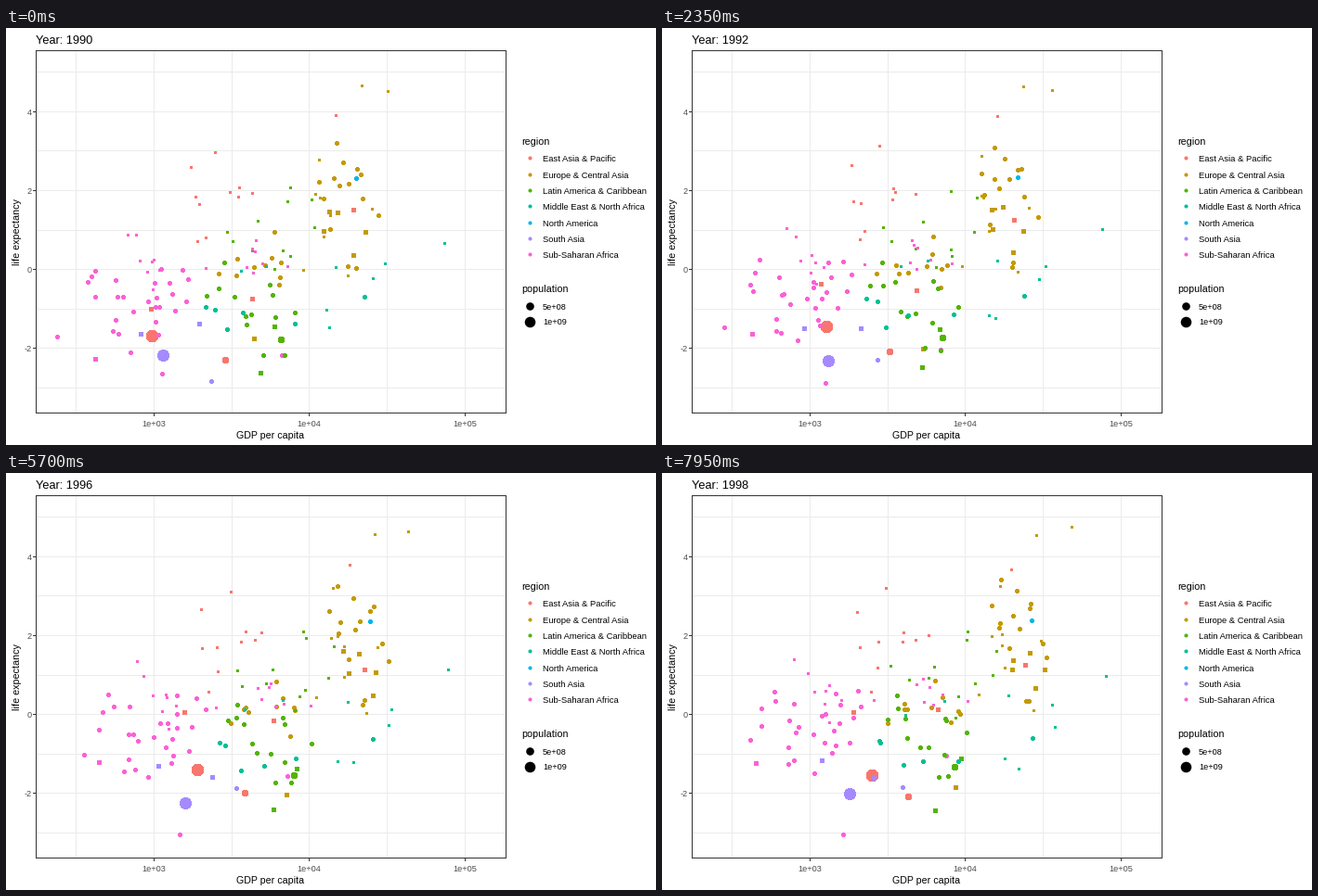
Recreate the animation shown at these times as a matplotlib script. Size 700 by 450 pixels, loop 8000 ms.

```python
import numpy as np
import matplotlib.pyplot as plt
from matplotlib.animation import FuncAnimation

W, H, DPI = 700, 450, 100
FRAMES, STEP = 160, 50
FRAMES_PER_YEAR = 19.1

EAST_ASIA, EUROPE, LATIN = "#F8766D", "#C49A00", "#53B400"
MIDDLE_EAST, NORTH_AM = "#00C094", "#00B6EB"
SOUTH_ASIA, AFRICA = "#A58AFF", "#FB61D7"
TINY, SMALL, MID, LARGE = 1.2, 2.05, 2.5, 3.1

plt.rcParams["font.family"] = "Liberation Sans"
fig = plt.figure(figsize=(W / DPI, H / DPI), dpi=DPI, facecolor="white")
ax = fig.add_axes([0, 0, 1, 1])
ax.set_xlim(0, W)
ax.set_ylim(H, 0)
ax.axis("off")


def label(x, y, text, px, color="black", **kw):
    kw.setdefault("va", "baseline")
    return ax.text(x, y, text, fontsize=px * 72 / DPI, color=color, **kw)


def line(xs, ys, color):
    ax.plot(xs, ys, color=color, lw=72 / DPI, antialiased=False,
            solid_capstyle="butt", zorder=1)


def discs(x, y, r, color, z=3):
    area = (2 * np.asarray(r) * 72 / DPI) ** 2
    return ax.scatter(x, y, s=area, c=color, linewidths=0,
                      antialiased=False, zorder=z)


# Positions are worked out once per year; frames blend between two years.
rng = np.random.default_rng(12)
years = np.arange(10)
t = years * FRAMES_PER_YEAR / (FRAMES - 1)
dots = []


def add(color, r, start, end, bend=0.0, wobble=0.0):
    """A straight drift with a vertical bow and a yearly random shift."""
    path = np.outer(1 - t, start) + np.outer(t, end)
    path[:, 1] += bend * np.sin(np.pi * t)
    path += rng.normal(0, 1, path.shape) * wobble
    dots.append((r, color, path))


# the countries that stand out
add(EAST_ASIA, 6.3, (157, 332), (226, 326), -10)
add(SOUTH_ASIA, 5.8, (169, 353), (202, 346), 10)
add(EAST_ASIA, LARGE, (236, 358), (265, 349), -8)
add(EAST_ASIA, MID, (156, 303), (206, 258), -17)
add(EAST_ASIA, MID, (265, 292), (297, 255), 2)
add(EAST_ASIA, MID, (374, 196), (391, 207), 10)
add(EAST_ASIA, TINY, (355, 94), (376, 104), -3)
add(EUROPE, TINY, (383, 62), (403, 67))
add(EUROPE, TINY, (411, 68), (441, 58), 3)
add(EUROPE, MID, (267, 335), (316, 339), 12)
add(LATIN, MID, (289, 322), (322, 308), 9)
add(LATIN, LARGE, (296, 336), (315, 317), 5)
add(LATIN, MID, (274, 372), (294, 364), -4)
add(MIDDLE_EAST, TINY, (472, 232), (478, 219), -14)
add(MIDDLE_EAST, SMALL, (386, 290), (399, 286))
add(MIDDLE_EAST, TINY, (348, 323), (384, 319), -11)
add(NORTH_AM, SMALL, (377, 162), (398, 159))
add(SOUTH_ASIA, MID, (208, 319), (228, 329), 2)
add(SOUTH_ASIA, MID, (145, 330), (172, 310))
add(SOUTH_ASIA, SMALL, (221, 381), (259, 339), -14)
add(AFRICA, SMALL, (55, 333), (95, 288), 4)
add(AFRICA, MID, (96, 357), (101, 313), -18)
add(AFRICA, SMALL, (297, 353), (306, 305), 11)
add(AFRICA, SMALL, (168, 373), (195, 390), 6)


def cloud(color, r, n, centre, spread, drift):
    """A loose regional cluster that drifts together."""
    for u in rng.normal(0, 1, (n, 2)).clip(-1.8, 1.8):
        start = np.add(centre, u * spread)
        end = start + drift + rng.normal(0, 6, 2)
        add(color, r, start, end, rng.normal(0, 4), wobble=2.5)


cloud(EAST_ASIA, TINY, 10, (222, 182), (32, 30), (15, -3))
cloud(EUROPE, SMALL, 14, (368, 188), (18, 38), (20, -10))
cloud(EUROPE, MID, 5, (362, 220), (10, 14), (25, -4))
cloud(EUROPE, TINY, 8, (330, 205), (40, 35), (18, -12))
cloud(EUROPE, SMALL, 10, (270, 265), (32, 24), (12, -3))
cloud(LATIN, TINY, 11, (283, 210), (26, 36), (22, -5))
cloud(LATIN, SMALL, 13, (264, 300), (26, 32), (18, -20))
cloud(MIDDLE_EAST, TINY, 6, (310, 250), (55, 40), (20, -6))
cloud(MIDDLE_EAST, SMALL, 5, (265, 305), (30, 18), (16, -5))
cloud(AFRICA, SMALL, 26, (150, 300), (32, 26), (18, -22))
cloud(AFRICA, TINY, 8, (152, 265), (14, 24), (18, -16))
cloud(AFRICA, TINY, 8, (275, 245), (35, 18), (20, -8))

dots.sort(key=lambda d: -d[0])
radii, colors, paths = zip(*dots)
paths = np.stack(paths, axis=1)

# panel: grid, border, ticks
GRID, DARK, GREY = "#EBEBEB", "#333333", "#4D4D4D"
LEFT, RIGHT, TOP, BOTTOM = 32, 538, 24, 415
for k in range(6):
    x = round(75.2 + 83.75 * k)
    line([x, x], [TOP, BOTTOM], GRID)
for k in range(9):
    y = round(47.2 + 42.6 * k)
    line([LEFT, RIGHT], [y, y], GRID)
line([LEFT, RIGHT, RIGHT, LEFT, LEFT], [TOP, TOP, BOTTOM, BOTTOM, TOP], DARK)
for k, name in enumerate(("1e+03", "1e+04", "1e+05")):
    x = round(159 + 167.5 * k)
    line([x, x], [BOTTOM, BOTTOM + 3], DARK)
    label(x, 429.5, name, 9.2, GREY, ha="center")
for k, name in enumerate(("4", "2", "0", "-2")):
    y = round(89.8 + 85.2 * k)
    line([LEFT - 3, LEFT], [y, y], DARK)
    label(27.5, y + 4, name, 9.2, GREY, ha="right")
label(285, 443, "GDP per capita", 10.6, ha="center")
label(12, 220.5, "life expectancy", 10.7, ha="center", va="center", rotation=90)

# legends
label(555, 126, "region", 10.7)
regions = (("East Asia & Pacific", EAST_ASIA), ("Europe & Central Asia", EUROPE),
           ("Latin America & Caribbean", LATIN),
           ("Middle East & North Africa", MIDDLE_EAST),
           ("North America", NORTH_AM), ("South Asia", SOUTH_ASIA),
           ("Sub-Saharan Africa", AFRICA))
for k, (name, color) in enumerate(regions):
    y = round(140.5 + 17.3 * k)
    discs([563.5], [y - .5], SMALL, color)
    label(578, y + 4, name, 9.4)
label(555, 285, "population", 10.7)
for y, r, name in ((299.5, 4.3, "5e+08"), (316.5, 5.8, "1e+09")):
    discs([563.5], [y], r, "black")
    label(578, y + 4, name, 9.2)

title = label(32, 17, "", 12.8)
points = discs(*paths[0].T, radii, colors, z=2)


def update(i):
    year, part = divmod(i / FRAMES_PER_YEAR, 1)
    k = int(year)
    title.set_text(f"Year: {1990 + k + (part >= .5)}")
    pos = paths[k] * (1 - part) + paths[k + 1] * part
    points.set_offsets(np.round(pos) + .5)  # whole-pixel steps
    return title, points


anim = FuncAnimation(fig, update, frames=FRAMES, interval=STEP,
                     init_func=lambda: update(0), repeat=True, repeat_delay=0)
plt.show()
```
